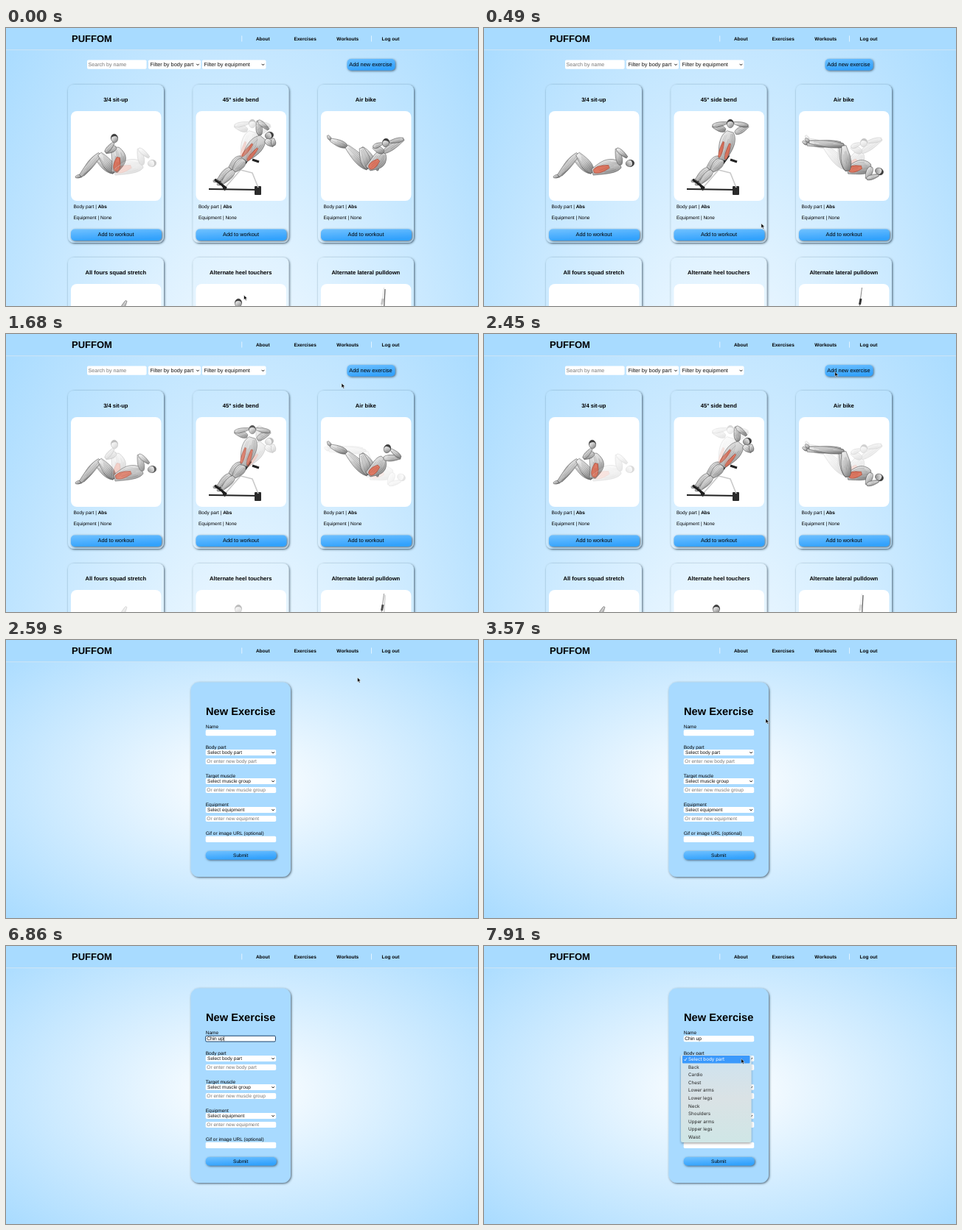
An HTML page that plays this animation: 640 by 378 pixels, repeating every 8000 ms.

```html
<!DOCTYPE html>
<html lang="en">
<head>
<meta charset="utf-8">
<title>Workout planner</title>
<style>
  html, body { margin: 0; width: 100%; height: 100%; overflow: hidden; background: #b5e0ff; }
  svg { display: block; width: 100%; height: 100%; }
  text { font-family: "Liberation Sans", Arial, sans-serif; text-rendering: geometricPrecision; white-space: pre; }
  .menu text { font-family: Inter, "Liberation Sans", sans-serif; }
  .b { font-weight: bold; }
</style>
</head>
<body>
<svg id="stage" viewBox="0 0 640 378" xmlns="http://www.w3.org/2000/svg">
  <defs>
    <radialGradient id="listBg" gradientUnits="userSpaceOnUse" cx="0" cy="0" r="1" gradientTransform="translate(320 600) scale(452 848)">
      <stop offset="0" stop-color="#fff"/><stop offset="1" stop-color="#a8dbff"/>
    </radialGradient>
    <radialGradient id="formBg" gradientUnits="userSpaceOnUse" cx="0" cy="0" r="1" gradientTransform="translate(320 196) scale(452 262)">
      <stop offset="0" stop-color="#fff"/><stop offset="1" stop-color="#a8dbff"/>
    </radialGradient>
    <linearGradient id="btn" x2=".35" y2="1">
      <stop offset="0" stop-color="#70c1ff"/><stop offset="1" stop-color="#33a2fd"/>
    </linearGradient>
    <linearGradient id="skin" x2=".6" y2="1">
      <stop offset="0" stop-color="#f6f6f6"/><stop offset=".55" stop-color="#cfcfcf"/><stop offset="1" stop-color="#8c8c8c"/>
    </linearGradient>
    <linearGradient id="menuBg" x2="0" y2="1">
      <stop offset="0" stop-color="#cde3f0"/><stop offset=".5" stop-color="#dae2e5"/><stop offset="1" stop-color="#cfe6e6"/>
    </linearGradient>
    <filter id="shade" x="-20%" y="-40%" width="140%" height="190%">
      <feDropShadow dx="1" dy="1" stdDeviation="1.4" flood-color="#23384a" flood-opacity=".8"/>
    </filter>
    <filter id="soft" x="-10%" y="-10%" width="120%" height="120%">
      <feDropShadow dx="0" dy="1.5" stdDeviation="1.8" flood-opacity=".35"/>
    </filter>
  </defs>
</svg>
<script>
const LOOP = 8000, FORM_AT = 2590, FOCUS_AT = 4270, HIDE_AT = 4970, SHOW_AT = 7070, OPEN_AT = 7490;
const stage = document.getElementById('stage');
const clamp = v => Math.max(0, Math.min(1, v));
let seed = 7;
const random = () => (seed = seed * 16807 % 2147483647) / 2147483647;

// Markup helpers
const rect = (x, y, w, h, r, fill, more = '') =>
  `<rect x="${x}" y="${y}" width="${w}" height="${h}" rx="${r}" fill="${fill}" ${more}/>`;
const text = (x, y, size, str, more = '') => `<text x="${x}" y="${y}" font-size="${size}" ${more}>${str}</text>`;
const line = (d, color, w, more = '') =>
  `<path d="${d}" fill="none" stroke="${color}" stroke-width="${w}" stroke-linejoin="round" ${more}/>`;
const group = (id, body, more = '') => `<g id="${id}" ${more}>${body}</g>`;
const mid = 'text-anchor="middle"';
const shade = 'filter="url(#shade)"';
const button = (x, y, w, h, size, label) =>
  rect(x, y, w, h, 5, 'url(#btn)', shade) + text(x + w / 2 - .5, y + h / 2 + size * .3, size, label, mid);
const field = (x, y, w, h, size, label, color = '#757575', pad = 1.6) =>
  rect(x, y, w, h, 1.8, '#fff') + text(x + pad, y + h / 2 + size * .35, size, label, `fill="${color}"`);
const select = (x, y, w, h, size, label) => field(x, y, w, h, size, label, '#111', 2.4)
  + line(`M${x + w - 5.7} ${y + h / 2 - .8}l1.7 1.8 1.7-1.8`, '#111', 1);

// Point at share s of the way from a to b, moved sideways by off
function at(a, b, s, off = 0) {
  const dx = b[0] - a[0], dy = b[1] - a[1], len = Math.hypot(dx, dy);
  return [a[0] + dx * s - dy / len * off, a[1] + dy * s + dx / len * off];
}
const polyline = pts => 'M' + pts.map(p => p.map(v => v.toFixed(1)).join(' ')).join('L');

// A muscle swells soon after a, thins towards b and carries fine fibres
function muscle(a, b, w, bend = 0, red = false) {
  const steps = 10;
  const edge = (k, from = 0, to = 1) => Array.from({ length: steps + 1 }, (_, i) => {
    const s = from + (to - from) * i / steps;
    const r = w * (.45 + .55 * Math.sin(Math.PI * s ** .75));
    return at(a, b, s, k * r + bend * Math.sin(Math.PI * s));
  });
  const outline = polyline([...edge(1), ...edge(-1).reverse()]) + 'Z';
  const dark = red ? '#99301f' : '#3c3c3c';
  let out = `<path d="${outline}" fill="${red ? '#dd7a64' : 'url(#skin)'}" stroke="${dark}" stroke-width=".5" stroke-linejoin="round"/>`;
  for (let k = -.7; k < .8; k += 2.2 / w)
    out += line(polyline(edge(k, random() * .4, .6 + random() * .4)), dark, .4, `opacity="${(.3 + random() * .4).toFixed(2)}"`);
  return out;
}

function leg(hip, knee, ankle) {
  const a = Math.atan2(ankle[1] - knee[1], ankle[0] - knee[0]) + .6;
  const toe = [ankle[0] + 7 * Math.cos(a), ankle[1] + 7 * Math.sin(a)];
  return muscle(ankle, toe, 2.2) + muscle(knee, ankle, 4.6) + muscle(hip, knee, 6.5);
}
const arm = (shoulder, elbow, hand) => muscle(shoulder, elbow, 4.3) + muscle(elbow, hand, 3.2);

// Torso, abs, head and arms; each arm is [elbow, hand]
function upper({ hip, neck, head, arms, bend = 0, wide = 0, width = 9.5, abs = [0], absWidth = 4.5 }) {
  const tilt = Math.atan2(head[1] - neck[1], head[0] - neck[0]) * 180 / Math.PI + 90;
  return muscle(neck, hip, width, -bend)
    + abs.map(k => muscle(at(hip, neck, .05, k + bend * .4), at(hip, neck, .6, k + bend * .8), absWidth, 0, true)).join('')
    + `<g transform="translate(${head}) rotate(${tilt.toFixed(0)})">
      <ellipse rx="4.6" ry="5.8" fill="url(#skin)" stroke="#444" stroke-width=".5"/>
      <path d="M-4.8 1C-5-8 5-8 4.9 1L3.4-2Q0-4-3.4-2Z" fill="#3d3d3d"/></g>`
    + arms.map(([elbow, hand], i) => arm(at(neck, hip, 0, i ? wide : -wide), elbow, hand)).join('');
}

// Sit-up
const sitHip = [147, 196];
const sitLegs = leg(sitHip, [122, 175], [104, 200]) + leg(sitHip, [127, 171], [101, 201]);
const sitUp = upper({ hip: sitHip, neck: [149, 162], head: [147, 150], bend: 5, arms: [[[135, 169], [146, 156]]] });
const sitDown = upper({ hip: sitHip, neck: [185, 186], head: [198, 184], bend: -2, arms: [[[180, 164], [194, 176]]] });

// Side bend
const bendHip = [323, 179];
const bench = line('M275 219L345 220M289 206L297 221', '#222', 2) + rect(337, 215, 9, 12, 1, '#2b2b2b')
  + line('M298 216L318 193L334 197L342 217', '#c9c9c9', 1.6) + line('M324 184L332 173M334 179L343 182', '#222', 3);
const bendLegs = leg(at(bendHip, [291, 209], 0, 4), [304, 191], [288, 207]) + leg(bendHip, [309, 194], [293, 211])
  + line('M283 206L299 218', '#1d1d1d', 3);
const bendPose = more => upper({ hip: bendHip, width: 10, abs: [-5, 4], absWidth: 2.2, ...more });
const bendUp = bendPose({ neck: [334, 141], head: [334, 130], wide: 7, arms: [[[358, 133], [339, 129]], [[310, 133], [329, 129]]] });
const bendSide = bendPose({ neck: [348, 149], head: [357, 146], wide: 5, arms: [[[363, 160], [362, 150]], [[342, 126], [356, 138]]] });

// Air bike
const bikeHip = [491, 191];
const bikeLegs = leg(bikeHip, [462, 161], [440, 152]) + leg(bikeHip, [482, 163], [503, 187]);
const bikePose = more => bikeLegs + upper({ hip: bikeHip, neck: [512, 169], bend: 3, ...more });
const bikeA = bikePose({ head: [515, 156], arms: [[[539, 151], [520, 155]], [[498, 162], [510, 157]]] });
const bikeC = bikePose({ head: [517, 156], arms: [[[535, 168], [522, 157]]] });
const bikeMid = leg([493, 194], [484, 157], [438, 158])
  + upper({ hip: [493, 194], neck: [525, 189], head: [536, 195], bend: -2, arms: [[[519, 205], [535, 200]]] })
  + leg([493, 194], [488, 160], [441, 155]);

// Tops of the second row
const stretch = muscle([155, 386], [163, 371], 2.5);
const heel = upper({ hip: [314, 420], neck: [314, 388], head: [315, 374], arms: [] });
const pullA = line('M514 355L512.5 382', '#666', 1.3);
const pullB = line('M512.5 353L509 380', '#777', .9) + line('M511 368L509.5 376', '#333', 3);

function card(col, row, title) {
  const x = 84 + col * 169.5, y = 77 + row * 235;
  return rect(x, y, 130, 215, 8, 'url(#listBg)', shade)
    + text(x + 64.8, y + 22.6, 7.6, title, `class="b" ${mid}`)
    + rect(x + 4, y + 36, 122.5, 122, 8, '#fff')
    + text(x + 7.5, y + 167.6, 6.5, 'Body part | <tspan class="b">Abs</tspan>')
    + text(x + 7.5, y + 182.7, 6.5, 'Equipment | None')
    + button(x + 4, y + 196.5, 123, 15.5, 7.35, 'Add to workout');
}
const titles = ['3/4 sit-up', '45° side bend', 'Air bike', 'All fours squad stretch', 'Alternate heel touchers', 'Alternate lateral pulldown'];

const listPage = rect(0, 0, 640, 378, 0, 'url(#listBg)')
  + field(110, 43.5, 80.5, 12.3, 7.1, 'Search by name')
  + select(193, 43.5, 71, 12.3, 7.35, 'Filter by body part') + select(266, 43.5, 86.5, 12.3, 7.35, 'Filter by equipment')
  + button(462.5, 42, 65, 15.5, 7.4, 'Add new exercise')
  + titles.map((t, i) => card(i % 3, Math.floor(i / 3), t)).join('')
  + bench + sitLegs + bendLegs
  + group('poseA', sitUp + bendSide + stretch + heel + pullA)
  + group('poseB', sitDown + bendUp + pullB)
  + group('bikeA', bikeA) + group('bikeMid', bikeMid) + group('bikeC', bikeC);

const choice = (y, label, pick, hint) => text(270.7, y, 6.5, label)
  + select(270.7, y + 1, 95.5, 8, 6.5, pick) + field(270.7, y + 13, 95.5, 8, 6.6, hint);

const parts = ['Back', 'Cardio', 'Chest', 'Lower arms', 'Lower legs', 'Neck', 'Shoulders', 'Upper arms', 'Upper legs', 'Waist'];
const menu = rect(267, 148, 95.5, 119, 3, 'url(#menuBg)', 'filter="url(#soft)"')
  + rect(269, 149, 91.5, 10.5, 1, '#3b99fc')
  + line('M271.3 154.3l1.4 1.7 2.2-3.7', '#fff', .8)
  + text(277, 156.4, 6.3, 'Select body part', 'fill="#fff"')
  + parts.map((p, i) => text(277, 166.8 + i * 10.56, 6.3, p, 'fill="#222"')).join('');

const formPage = rect(0, 0, 640, 378, 0, 'url(#formBg)')
  + rect(250.5, 57.5, 135.5, 264.5, 11, '#a8daff', shade)
  + text(318.2, 101.6, 14.65, 'New Exercise', `class="b" ${mid}`)
  + text(270.7, 120.3, 6.5, 'Name') + rect(270.7, 122, 95.5, 8.3, 1.8, '#fff')
  + rect(270.7, 122.2, 94.8, 7.8, 1.5, 'none', 'id="focus" stroke="#123f6b" stroke-width="1"')
  + text(272.2, 128.4, 6.6, '', 'id="typed"')
  + rect(0, 123.1, .6, 6.2, 0, '#000', 'id="caret"')
  + choice(148, 'Body part', 'Select body part', 'Or enter new body part')
  + choice(187, 'Target muscle', 'Select muscle group', 'Or enter new muscle group')
  + choice(226, 'Equipment', 'Select equipment', 'Or enter new equipment')
  + text(270.7, 265.1, 6.5, 'Gif or image URL (optional)') + rect(270.7, 266.7, 95.5, 8.3, 1.8, '#fff')
  + button(270.7, 287, 96, 11.5, 6.5, 'Submit')
  + group('menu', menu, 'class="menu"');

const nav = [['About', 348.3], ['Exercises', 405.6], ['Workouts', 463.3], ['Log out', 521.5]];
const header = rect(0, 0, 640, 29.5, 0, '#a8dbff') + rect(0, 29.3, 640, .9, 0, '#d3e6f2')
  + text(89, 18.8, 13, 'PUFFOM', 'class="b"')
  + nav.map(([s, x]) => text(x, 16.8, 6.5, s, `class="b" ${mid}`)).join('')
  + rect(319.3, 10.5, .9, 8, 0, '#e8f6ff') + rect(495, 10.5, .9, 8, 0, '#e8f6ff');

const pointer = group('cursor',
  '<path id="arrow" d="M0 0V6.2L1.5 4.9 2.5 7.2 3.6 6.7 2.6 4.5H4.6Z" fill="#000" stroke="#fff" stroke-width=".5"/>'
  + line('M-1.4-3Q0-3 0-2V2Q0 3-1.4 3M1.4-3Q0-3 0-2M0 2Q0 3 1.4 3', '#222', .7, 'id="beam"'));

stage.insertAdjacentHTML('beforeend', group('list', listPage) + group('form', formPage) + header + pointer);
const el = {};
stage.querySelectorAll('[id]').forEach(e => { el[e.id] = e; });
const show = (id, on) => el[id].setAttribute('visibility', on ? 'inherit' : 'hidden');
const fade = (id, v) => el[id].setAttribute('opacity', clamp(v).toFixed(3));

// Pointer stops: time, x, y; joined by a monotone curve
const stops = [[0, 322.5, 363.5], [490, 375.8, 266], [1680, 455, 67], [2590, 476.5, 51],
  [4060, 349, 126.5], [SHOW_AT, 349, 126.5], [7450, 348.8, 153.3]];
function along(t, k) {
  const end = stops.length - 1;
  let i = 0;
  while (i < end - 1 && t >= stops[i + 1][0]) i++;
  const slope = j => (stops[j + 1][k] - stops[j][k]) / (stops[j + 1][0] - stops[j][0]);
  const tangent = j => {
    if (j === 0) return slope(0);
    if (j === end) return 0;
    const a = slope(j - 1), b = slope(j);
    return a * b <= 0 ? 0 : 2 * a * b / (a + b);
  };
  const h = stops[i + 1][0] - stops[i][0], s = clamp((t - stops[i][0]) / h), s2 = s * s, s3 = s2 * s;
  return stops[i][k] * (2 * s3 - 3 * s2 + 1) + stops[i + 1][k] * (3 * s2 - 2 * s3)
    + h * (tangent(i) * (s3 - 2 * s2 + s) + tangent(i + 1) * (s3 - s2));
}

const word = 'Chin up', keyTimes = [HIDE_AT, 5110, 5180, 5320, 5530, 5670, 5870];
const POSE = 740;

function updateList(t) {
  const u = (t + 100) % (2 * POSE);
  const b = clamp(u / 400) - clamp((u - POSE) / 400);
  fade('poseA', 1.4 * (1 - b));
  fade('poseB', 1.15 * b);
  const near = centre => {
    const d = Math.abs(t - centre) % (4 * POSE);
    return clamp(1 - (Math.min(d, 4 * POSE - d) - 280) / 300);
  };
  fade('bikeA', near(0));
  fade('bikeMid', near(POSE) + near(3 * POSE));
  fade('bikeC', near(2 * POSE));
}

function updateForm(t) {
  const count = keyTimes.filter(k => t >= k).length;
  const focused = t >= FOCUS_AT && t < OPEN_AT;
  const since = t - (count ? keyTimes[count - 1] : FOCUS_AT);
  const str = word.slice(0, count);
  if (el.typed.textContent !== str) el.typed.textContent = str;
  el.caret.setAttribute('x', 272.4 + (count ? el.typed.getComputedTextLength() : 0));
  show('focus', focused);
  show('caret', focused && Math.floor(since / 490) % 2 === 0);
  show('menu', t >= OPEN_AT);
}

function update(t) {
  const form = t >= FORM_AT;
  show('list', !form);
  show('form', form);
  if (form) updateForm(t);
  else updateList(t);

  const x = along(t, 1), y = along(t, 2);
  const beam = form && x > 271 && x < 366 && y > 122 && y < 131;
  const seen = t < HIDE_AT || t >= SHOW_AT;
  el.cursor.setAttribute('transform', `translate(${x.toFixed(2)} ${y.toFixed(2)})`);
  show('beam', seen && beam);
  show('arrow', seen && !beam);
}

const start = performance.now();
function tick() {
  update((performance.now() - start) % LOOP);
  requestAnimationFrame(tick);
}
tick();
</script>
</body>
</html>
```
